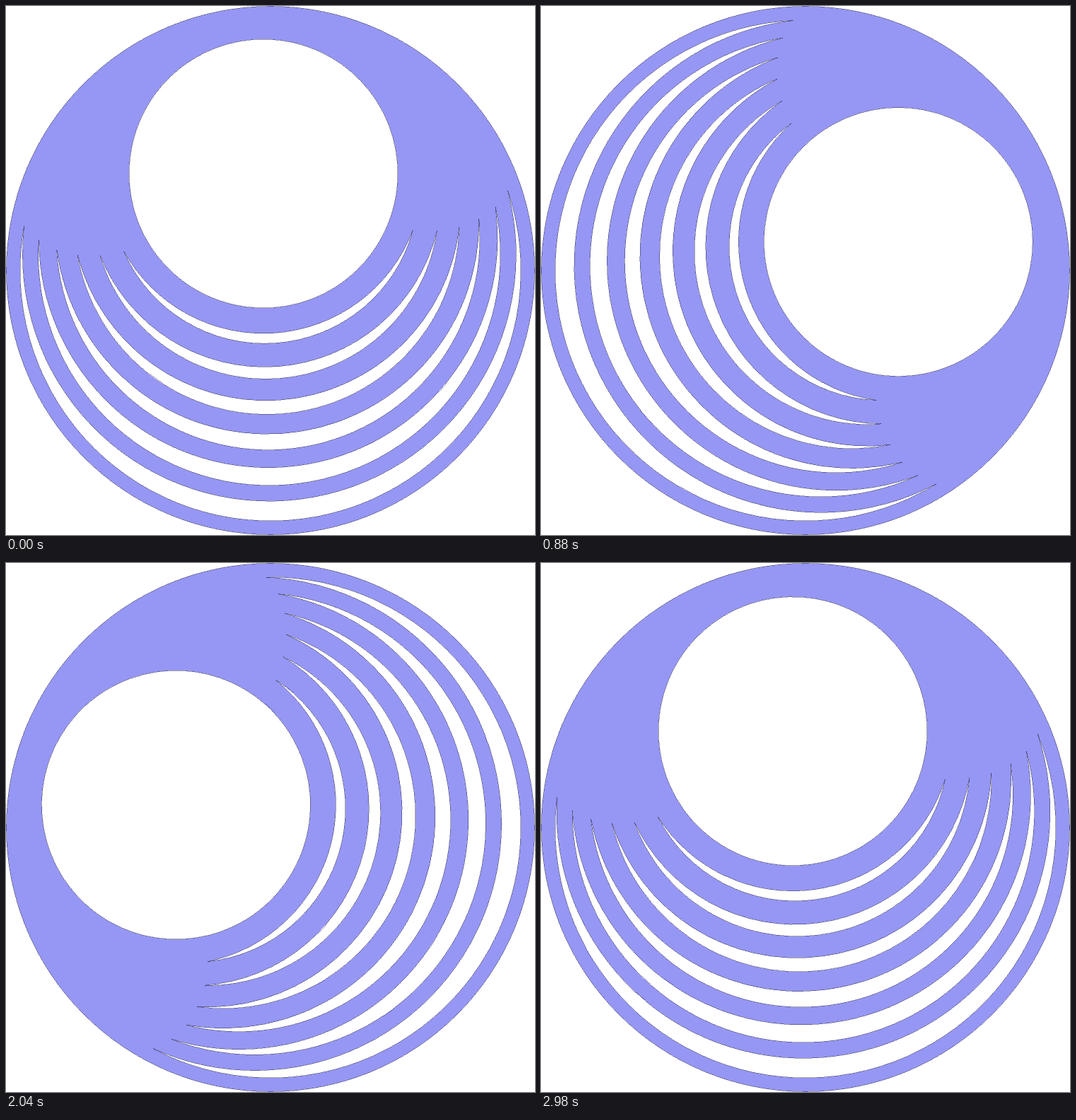
Animation, 748 px wide and 748 px high, one loop 3000 ms. Source, as an HTML page:

```html
<!DOCTYPE html>
<html lang="en">
<head>
<meta charset="utf-8">
<title>Swinging rings</title>
<style>
  @property --phase {
    syntax: "<angle>";
    inherits: false;
    initial-value: 0deg;
  }
  html, body {
    margin: 0;
    width: 100%;
    height: 100%;
    overflow: hidden;
    background: #fff;
  }
  svg {
    display: block;
    width: 100vw;
    height: 100vh;
    fill: #fff;
    stroke: #000;
    stroke-width: .35;
    shape-rendering: crispEdges;
  }
  .disc { fill: #9696f5; }
  /* A pendulum: the phase runs evenly, the angle follows its sine. */
  #swing {
    transform: rotate(calc(-4.16deg + 80deg * sin(var(--phase))));
    animation: swing 3s steps(150) infinite;
  }
  @keyframes swing {
    from { --phase: 0deg; }
    to { --phase: 360deg; }
  }
</style>
</head>
<body>
<svg viewBox="-374 -374 748 748">
  <circle class="disc" r="373.6"/>
  <g id="swing">
    <path id="gaps"/>
    <circle cy="-137.35" r="190"/>
  </g>
</svg>
<script>
  const RINGS = 7;
  const SHIFT = 137.35 / (RINGS - 1);
  const outer = i => 373.6 - 24.6 * i;
  const inner = i => 354 - 164 / 6 * i;

  // Crescent between the hole of ring i and the rim of ring i + 1.
  function crescent(i) {
    const R = inner(i), r = outer(i + 1);
    const tip = (r * r - R * R - SHIFT * SHIFT) / (2 * SHIFT);
    const x = Math.sqrt(R * R - tip * tip);
    const y = tip - i * SHIFT;
    const bigHole = tip < 0 ? 1 : 0;
    const bigRim = tip + SHIFT < 0 ? 1 : 0;
    return `M${-x} ${y}A${R} ${R} 0 ${bigHole} 0 ${x} ${y}` +
           `A${r} ${r} 0 ${bigRim} 1 ${-x} ${y}Z`;
  }

  const paths = Array.from({ length: RINGS - 1 }, (_, i) => crescent(i));
  document.getElementById("gaps").setAttribute("d", paths.join(""));
</script>
</body>
</html>
```
